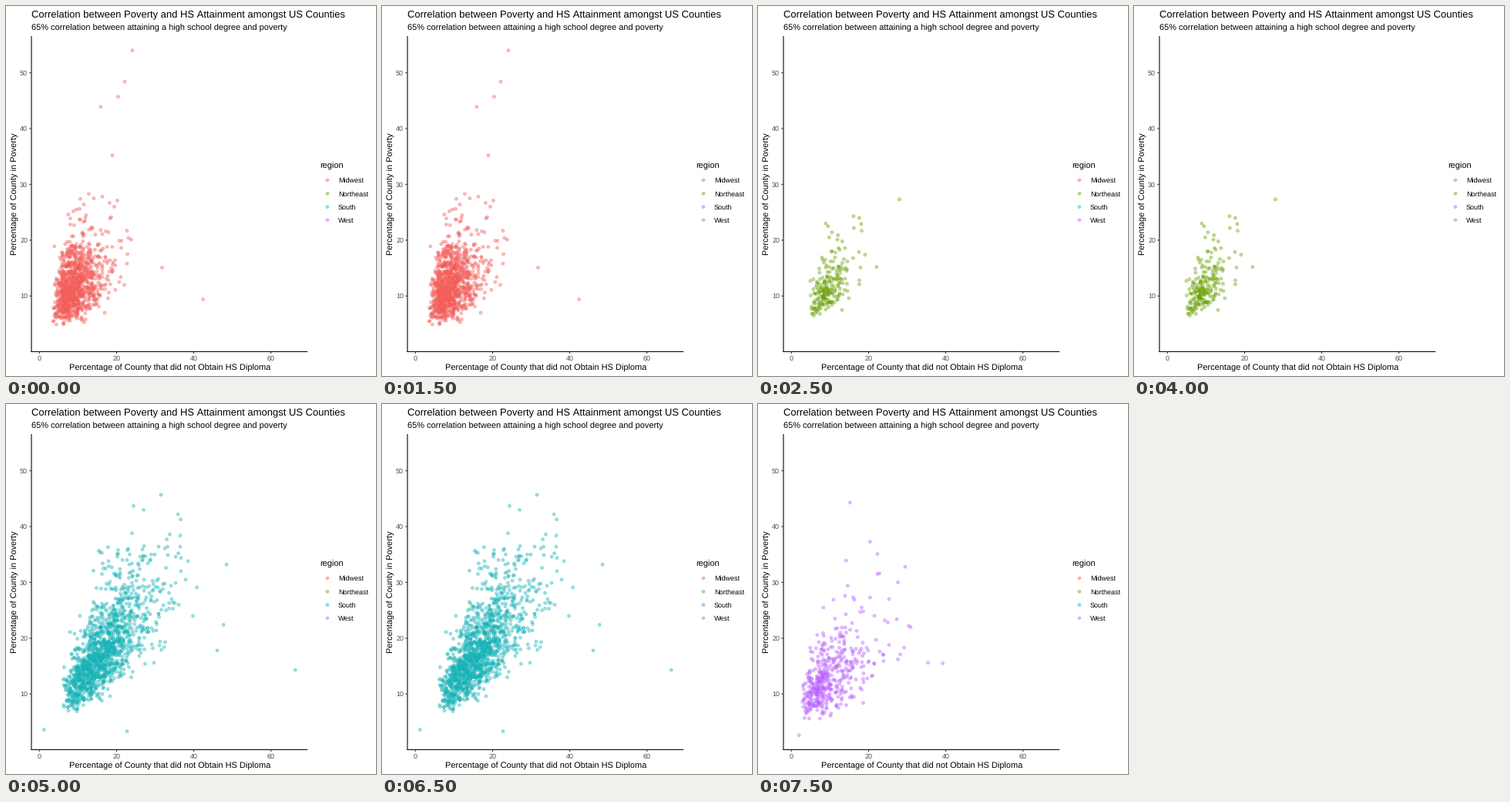
A matplotlib script that plays this animation: 480x480 px, repeating every 10000 ms.

```python
import matplotlib.pyplot as plt
import numpy as np
from matplotlib.animation import FuncAnimation

SIZE, DPI = 480, 72
LEFT, RIGHT, TOP, BOTTOM = 33.0, 391.3, 39.0, 448.4
TICK = 2.75
DOT_SIZE = 4.0 ** 2

plt.rcParams.update({
    "font.family": "Liberation Sans",
    "text.hinting": "none",
    "text.hinting_factor": 1,
    "savefig.dpi": DPI,
})

# Each region is a correlated log-normal cloud of n counties (median and log
# spread for x and y) plus the few counties that lie far outside it.
REGIONS = {
    "Midwest": dict(
        color="#F35E5A", n=1040, median=(9.1, 11.7), spread=(0.37, 0.34),
        corr=0.5, far=[(24.1, 54), (22.1, 48.4), (20.4, 45.7), (15.9, 43.9),
                       (18.9, 35.2), (31.8, 15.1), (42.4, 9.4)]),
    "Northeast": dict(
        color="#6CA107", n=212, median=(9.6, 11.6), spread=(0.28, 0.29),
        corr=0.62, far=[(28, 27.3), (16.1, 24.3), (17.6, 24), (22.1, 15.2)]),
    "South": dict(
        color="#17B3B7", n=1410, median=(16, 17.2), spread=(0.37, 0.36),
        corr=0.75, far=[(31.5, 45.7), (27, 43), (48.5, 33.2), (47.7, 22.4),
                        (46.1, 17.8), (66.3, 14.3), (22.7, 3.3), (1.2, 3.6)]),
    "West": dict(
        color="#B95EFF", n=440, median=(9.4, 13), spread=(0.5, 0.36),
        corr=0.6, far=[(15.2, 44.3), (20.4, 37.3), (22.3, 35.1), (14.2, 33.9),
                       (39.2, 15.5), (35.4, 15.6), (2, 2.6)]),
}


def to_px(x, y):
    return 43.3 + 5.007 * x, 448.6 - 7.24 * y


def cloud(rng, n, median, spread, corr, far, **_):
    z = rng.multivariate_normal([0, 0], [[1, corr], [corr, 1]], 2 * n)
    z = z[np.abs(z).max(axis=1) < 2.6][:n]
    values = np.vstack([median * np.exp(z * spread), far])
    return to_px(*values.round(1).T)


fig = plt.figure(figsize=(SIZE / DPI, SIZE / DPI), dpi=DPI, facecolor="white")
ax = fig.add_axes([0, 0, 1, 1])
ax.set(xlim=(0, SIZE), ylim=(SIZE, 0))
ax.axis("off")


def label(x, y, text, size, color="black", **kw):
    ax.text(x, y, text, fontsize=size, color=color, **kw)


def stroke(xs, ys, color="black"):
    ax.plot(xs, ys, color=color, lw=1.07, solid_capstyle="butt", snap=False)


def dots(xs, ys, color):
    # One size per dot keeps each at its exact subpixel position.
    return ax.scatter(xs, ys, s=np.full(len(xs), DOT_SIZE), color=color,
                      linewidths=0.8, alpha=0.4, snap=False, zorder=3)


label(LEFT, 15, "Correlation between Poverty and HS Attainment amongst US Counties", 13.4)
label(LEFT, 32, "65% correlation between attaining a high school degree and poverty", 11)
label(212.3, 473, "Percentage of County that did not Obtain HS Diploma", 11, ha="center")
label(16.8, 243.5, "Percentage of County in Poverty", 11, rotation=90,
      ha="right", va="center")

stroke([LEFT, LEFT], [TOP, BOTTOM + 0.5])
stroke([LEFT - 0.5, RIGHT], [BOTTOM, BOTTOM])
for value in range(0, 61, 20):
    x, _ = to_px(value, 0)
    stroke([x, x], [BOTTOM, BOTTOM + TICK], "#333333")
    label(x, 460, str(value), 8.8, "#4D4D4D", ha="center")
for value in range(10, 51, 10):
    _, y = to_px(0, value)
    stroke([LEFT - TICK, LEFT], [y, y], "#333333")
    label(28.1, y + 3.2, str(value), 8.8, "#4D4D4D", ha="right")

label(407.7, 211, "region", 11)
legend_y = 226 + 17.28 * np.arange(len(REGIONS))
dots([416.9] * len(REGIONS), legend_y, [r["color"] for r in REGIONS.values()])
for name, y in zip(REGIONS, legend_y):
    label(430.8, y + 3.2, name, 8.7)

rng = np.random.default_rng(12)
clouds = [dots(*cloud(rng, **region), region["color"])
          for region in REGIONS.values()]


def draw(frame):
    for i, points in enumerate(clouds):
        points.set_visible(i == frame)
    return clouds


anim = FuncAnimation(fig, draw, frames=len(clouds), interval=2500,
                     repeat=True, repeat_delay=0)
plt.show()
```
